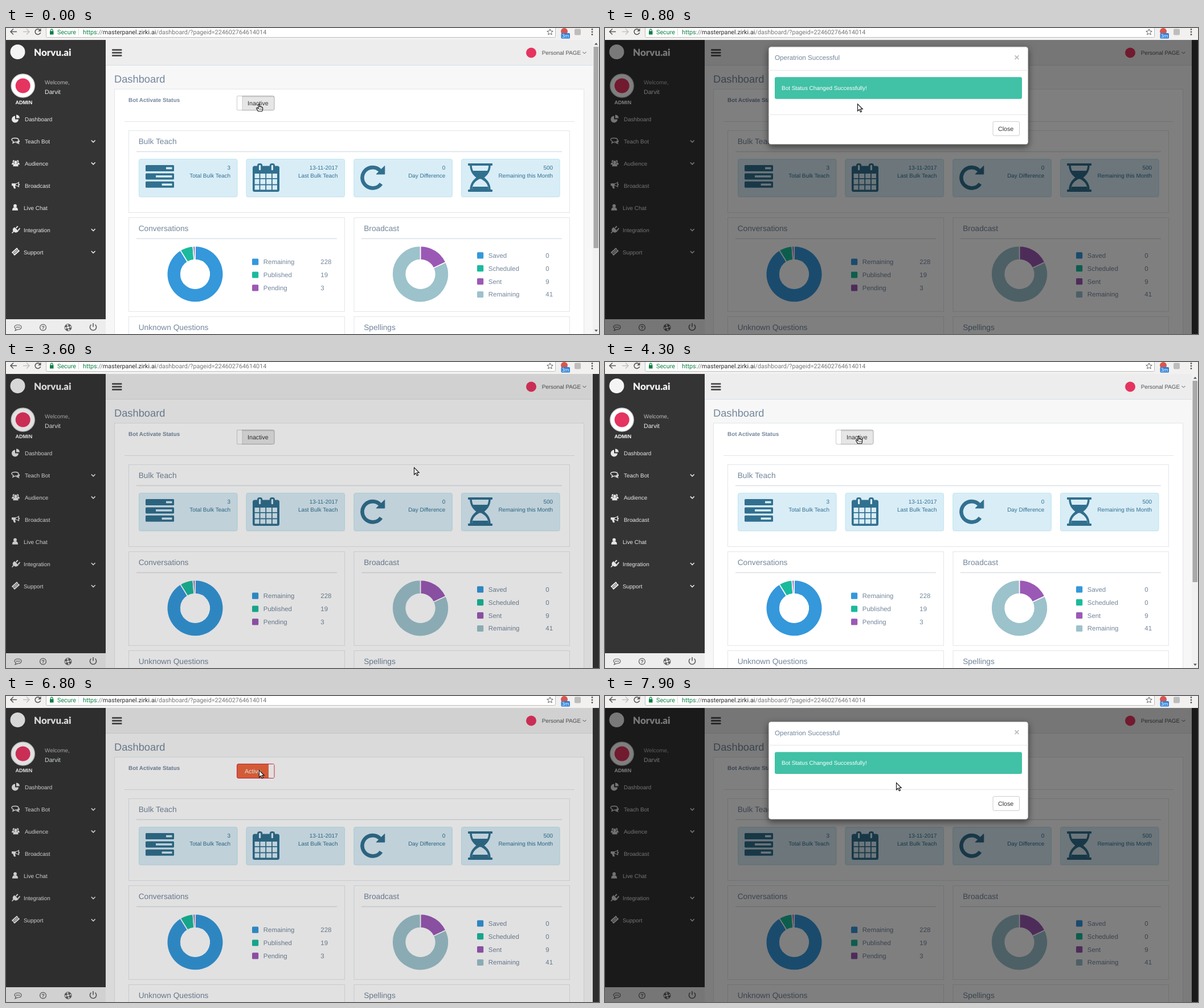
An HTML page for the animation above (8 s loop, 1041x538 px).

```html
<!DOCTYPE html>
<html lang="en">
<head>
<meta charset="utf-8">
<title>Dashboard</title>
<style>
html, body { margin: 0; width: 100%; height: 100%; overflow: hidden; }
svg { display: block; }
text { font-family: "Liberation Sans", Arial, sans-serif; text-rendering: geometricPrecision; white-space: pre; }
.bar text { font-family: Roboto, sans-serif; font-size: 10.75px; }
</style>
</head>
<body>
<svg id="stage" width="1041" height="538" viewBox="0 0 1041 538"></svg>
<script>
const INK = '#73879c', LINE = '#e2e5ea', DARK = '#343434', PALE = '#e7e7e7', INFO = '#31708f';
const BLUE = '#3498db', GREEN = '#1abb9c', PURPLE = '#9b59b6', TEAL = '#9cc2cb', PINK = '#e5345f';

const text = (x, y, s, size = 9.9, fill = INK, more = '') =>
  `<text x="${x}" y="${y}" font-size="${size}" fill="${fill}" ${more}>${s}</text>`;
const rect = (x, y, x2, y2, fill, more = '') =>
  `<rect x="${x}" y="${y}" width="${x2 - x}" height="${y2 - y}" fill="${fill}" ${more}/>`;
const path = (d, fill, more = '') => `<path d="${d}" fill="${fill}" ${more}/>`;
const stroke = (d, color, width = 1, more = '') => path(d, 'none', `stroke="${color}" stroke-width="${width}" ${more}`);
const circle = (x, y, r, fill, more = '') => `<circle cx="${x}" cy="${y}" r="${r}" fill="${fill}" ${more}/>`;
const at = (x, y, body, more = '') => `<g transform="translate(${x} ${y})" ${more}>${body}</g>`;
const border = (x, y, x2, y2, fill, color, more = '') =>
  rect(x + .5, y + .5, x2 - .5, y2 - .5, fill, `stroke="${color}" ${more}`);

function browserBar() {
  return '<g class="bar">' + rect(0, 0, 1041, 21, '#f2f1f0') +
    border(70, -5, 965, 17, '#fff', '#bcbcbc', 'rx="2"') +
    stroke('M19 6.5H8M13 1.5L8 6.5L13 11.5', '#5a5a5a', 1.6) +
    stroke('M30 6.5H41M36 1.5L41 6.5L36 11.5', '#c3c3c3', 1.6) +
    stroke('M60 4A4.8 4.8 0 1 0 60.6 8', '#5a5a5a', 1.6) + path('M61.5 .5V6H56Z', '#5a5a5a') +
    rect(77, 5.5, 83.5, 11.5, '#0b8043') + stroke('M78.5 6V4a1.8 1.8 0 0 1 3.6 0V6', '#0b8043', 1.2) +
    text(90, 10.5, 'Secure', 10.75, '#0b8043') + rect(127, 1, 128, 13, '#ddd') +
    text(135, 10.5, '<tspan fill="#0b8043">https</tspan><tspan fill="#777">://</tspan>masterpanel.zirki.ai' +
      '<tspan fill="#777">/dashboard/?pageid=224602764614014</tspan>', 10.75, '#2d2d2d') +
    path('M955 1.8l1.5 3.5 3.8.3-2.9 2.5.9 3.7-3.3-2-3.3 2 .9-3.7-2.9-2.5 3.8-.3Z', 'none', 'stroke="#666"') +
    circle(980, 6, 6, '#d9564c') + rect(974.5, 9, 990, 18.5, '#2c7fd6', 'rx="1.5"') +
    text(982.2, 17, '3m', 9, '#fff', 'text-anchor="middle" style="font-size:9px"') +
    rect(998, 1.5, 1009, 12.5, '#bdbdbd', 'rx="2"') +
    [2.5, 7, 11.5].map(y => circle(1029, y, 1.4, '#5a5a5a')).join('') + '</g>';
}

const person = (x, y, k) => at(x, y, circle(0, -2.6, 2.9, PALE) + path('M-5 5.5C-5 1 -3 0 0 0S5 1 5 5.5Z', PALE), `style="scale:${k}"`);
const menu = [
  ['Dashboard', path('M-1-5A6 6 0 1 0 5 1H-1Z', PALE) + path('M1-7A6 6 0 0 1 7-1H1Z', PALE)],
  ['Teach Bot', path('M-1-5C3-5 5-3.5 5-1.5S3 2 -1 2L-5 4L-4 1C-6 0-7-1-7-2C-7-4-4-5-1-5Z', 'none', `stroke="${PALE}" stroke-width="1.4"`) +
    path('M6-2C8 0 7 3 5 3L7 6L2 4L-1 3.5C3 3.5 6 1 6-2Z', PALE), 1],
  ['Audience', person(-4.5, -1.5, .72) + person(4.5, -1.5, .72) + at(0, 1.5, circle(0, -3, 3.5, DARK)) + person(0, 1, .9), 1],
  ['Broadcast', path('M-7-3H-1C2-3 4-5 6-6V4C4 3 2 1 -1 1L0 6H-3L-5 1H-7Z', PALE) + path('M0-2C2-2 3-3 4.5-4V2C3 1 2 0 0 0Z', DARK) + circle(6.3, -1, 1, PALE)],
  ['Live Chat', person(-1, 0, 1)],
  ['Integration', path('M-2-4L5 3C2 6 -1 6 -3 4L-6 7L-7 6L-4.5 3C-6 0-5-2-2-4ZM0-3L3-6.5L4.5-5L1-1.5ZM3.5 1L7-3L8-1.5L5 2.5Z', PALE), 1],
  ['Support', path('M-7 1L2-7L4-5C3.5-3.5 4.5-3 6-3L7-1L-2 7L-4 5C-3.5 3.5-4.5 3-6 3Z', PALE) + stroke('M-3.5 1.5L2-3.5L3.5-1.5L-2 3.5Z', DARK, 1), 1]
];

function sidebar() {
  let s = rect(0, 21, 175, 538, DARK) + circle(20.5, 42, 13, '#f4f4f4') +
    text(49, 49, 'Norvu.ai', 17, '#f4f4f4', 'style="font-family:Lato,sans-serif;font-weight:900"') +
    circle(29.7, 101.5, 20.5, '#fff', 'stroke="#d4d4d4" stroke-width="1.5"') + circle(29.7, 101.5, 13, PINK) +
    text(31.3, 133.5, 'ADMIN', 9.1, '#fff', 'font-weight="700" text-anchor="middle"') +
    text(68, 98.5, 'Welcome,', 9.9, '#bab8b8') + text(68, 116, 'Darvit', 10.67, '#ecf0f1');
  menu.forEach(([label, icon, opens], i) => {
    const y = 160.5 + i * 38.95;
    s += at(17, y - 1, icon) + text(i < 4 ? 33 : 31, y + 3.5, label, 9.9, PALE);
    if (opens) s += stroke(`M149.8 ${y - 2}l3.4 3.4l3.4-3.4`, PALE, 1.6);
  });
  const grey = '#5c5c5c';
  return s + rect(0, 512, 175, 538, '#ededed') +
    stroke('M21 522c4 0 6 1.8 6 4s-2 4-6 4l-5 2l1.5-3c-1.5-.8-2.5-1.7-2.5-3c0-2.2 2-4 6-4Z', grey, 1.1) +
    [18.5, 21, 23.5].map(x => circle(x, 526, .9, grey)).join('') +
    circle(65, 526.5, 5.4, 'none', `stroke="${grey}" stroke-width="1.2"`) +
    text(65, 529.8, '?', 9, grey, 'text-anchor="middle" font-weight="700"') +
    circle(109, 526.5, 4.3, 'none', `stroke="${grey}" stroke-width="3" stroke-dasharray="4 2.75"`) +
    circle(109, 526.5, 6, 'none', `stroke="${grey}"`) + circle(109, 526.5, 2.6, 'none', `stroke="${grey}"`) +
    stroke('M149.5 521.5a5.6 5.6 0 1 0 7 0M153 519v6.5', grey, 1.6);
}

function tasksIcon() {
  return [[281, 241], [263, 255.4], [273.6, 269.8]].map(([x, y]) =>
    rect(245, y, 295, y + 11, INFO, 'rx="1.6"') + rect(x, y + 3.7, 291.5, y + 7.3, '#d9edf7')).join('');
}

function calendarIcon() {
  let s = rect(433, 242.5, 480, 288, INFO, 'rx="3.5"');
  for (const [x, x2] of [[436.6, 444.6], [446.4, 455.3], [457.1, 466], [467.8, 476]])
    for (const [y, y2] of [[256, 264], [265.7, 274.6], [276.4, 284.4]]) s += rect(x, y, x2, y2, '#d9edf7');
  for (const x of [445.6, 467.4])
    s += rect(x - 4.6, 238, x + 4.6, 253, INFO, 'rx="4"') + rect(x - 1.6, 241, x + 1.6, 250, '#d9edf7', 'rx="1"');
  return s;
}

const repeatIcon = () => stroke('M658.5 273.8A18.2 18.2 0 1 1 656.5 250.4', INFO, 6.6) +
  path('M664.8 242.5V257H650Z', INFO, `stroke="${INFO}" stroke-linejoin="round"`);

const hourglassIcon = () => rect(811, 238, 854, 242, INFO, 'rx="1"') + rect(811, 284, 854, 288, INFO, 'rx="1"') +
  stroke('M816 241C816 252 821 258 828.5 263C821 268 816 274 816 285M849 241C849 252 844 258 836.5 263C844 268 849 274 849 285', INFO, 3.5) +
  path('M818 251H847C845 257 840 261 836 263C840 265 844 269 846 273L847 285H818L819 273C821 269 825 265 829 263C825 261 820 257 818 251Z', INFO) +
  path('M831 265.5H834C841 269 845 274 846 279H819C820 274 824 269 831 265.5Z', '#d9edf7');

function panel(x, y, x2, y2, title) {
  const inner = x === 215 ? 14 : 13.5;
  return border(x, y, x2, y2, '#fff', LINE) + text(x + 17.7, y + 24.3, title, 13.72) +
    rect(x + inner, y + 36.5, x2 - 14, y + 38.2, '#dfe3e8');
}

function donut(cx, cy, slices) {
  const total = slices.reduce((sum, [n]) => sum + n, 0);
  let turn = 0, s = '';
  const point = (r, a) => `${cx + r * Math.sin(a)} ${cy - r * Math.cos(a)}`;
  for (const [n, color] of slices) {
    const a = turn, b = turn += n / total * 2 * Math.PI, big = +(b - a > Math.PI);
    s += path(`M${point(49.3, a)}A49.3 49.3 0 ${big} 1 ${point(49.3, b)}L${point(25.3, b)}A25.3 25.3 0 ${big} 0 ${point(25.3, a)}Z`,
      color, 'stroke="#fff" stroke-width="1.6"');
  }
  return s;
}

const legend = (x, y, rows) => rows.map(([label, n, color], i) => {
  const cy = y + i * 22.9;
  return rect(x, cy - 5.5, x + 11.2, cy + 5.7, color, 'rx="1.5"') +
    text(x + 19.8, cy + 4, label, 11.43) + text(x + 120.3, cy + 4, n, 11.43);
}).join('');

function page() {
  const cards = [[233, 3, 'Total Bulk Teach'], [421.5, '13-11-2017', 'Last Bulk Teach'], [610.3, 0, 'Day Difference'], [799, 500, 'Remaining this Month']];
  return rect(175, 21, 1030, 538, '#f7f7f7') + rect(175, 21, 1030, 65, '#ededed') + rect(175, 65, 1030, 66, '#d9dee4') +
    [37, 42, 47].map(y => rect(186, y, 203.5, y + 3, '#555', 'rx="1"')).join('') +
    circle(922, 43.5, 9, PINK) + text(940.7, 46.7, 'Personal PAGE', 9.9, '#515356') + stroke('M1012.5 42l3 3l3-3', '#515356') +
    text(190, 96.2, 'Dashboard', 18.29) + border(190, 107, 1015, 545, '#fff', LINE) +
    text(215, 129.8, 'Bot Activate Status', 9.9, INK, 'font-weight="700"') + rect(208, 164, 998, 165, '#e4e4e4') +
    panel(215, 180, 990, 325, 'Bulk Teach') +
    cards.map(([x, n, label]) => rect(x, 231, x + 173.5, 298, '#000', 'rx="3" opacity=".06"') +
      border(x, 230, x + 173.5, 297, '#d9edf7', '#bce8f1', 'rx="3"') +
      text(x + 161, 248.8, n, 9.9, INFO, 'text-anchor="end"') + text(x + 161, 263.4, label, 9.9, INFO, 'text-anchor="end"')).join('') +
    tasksIcon() + calendarIcon() + repeatIcon() + hourglassIcon() +
    panel(215, 333, 595, 499, 'Conversations') + panel(610.5, 333, 990, 499, 'Broadcast') +
    donut(332, 432.8, [[228, BLUE], [19, GREEN], [3, PURPLE]]) + donut(727.5, 432.8, [[9, PURPLE], [41, TEAL]]) +
    legend(432, 411, [['Remaining', 228, BLUE], ['Published', 19, GREEN], ['Pending', 3, PURPLE]]) +
    legend(827, 399.7, [['Saved', 0, BLUE], ['Scheduled', 0, GREEN], ['Sent', 9, PURPLE], ['Remaining', 41, TEAL]]) +
    panel(215, 507, 595, 560, 'Unknown Questions') + panel(610.5, 507, 990, 560, 'Spellings');
}

const toggles = `<g id="off">${border(405, 119, 471.5, 145, '#e6e6e6', '#adadad', 'rx="2.5"')}` +
  rect(406, 120, 471, 122, '#000', 'opacity=".07"') + border(405, 119, 415.5, 145, '#fff', '#ccc', 'rx="2"') +
  text(424, 135.8, 'Inactive', 10.67, '#333') +
  `</g><g id="on">${border(405, 119, 471.5, 145, '#ee673c', '#d9274f', 'rx="2.5"')}` +
  rect(461, 120, 470.5, 144, '#fff', 'rx="1"') + text(419, 135.8, 'Active', 10.67, '#fff') + '</g>';

const scrollbar = `<g id="scrollbar">${rect(1030, 21, 1041, 538, '#f1f1f1')}${rect(1031.5, 33, 1040, 387, '#a9a9a9')}` +
  path('M1033 29.5h6l-3-3.5Z', '#505050') + path('M1033 530.5h6l-3 3.5Z', '#505050') + '</g>';

const dialog = '<g id="dialog">' +
  border(286.5, 44.5, 743.5, 217.5, '#fff', '#777', 'rx="4.5" style="filter:drop-shadow(0 4px 6px rgba(0,0,0,.5))"') +
  text(298, 68.5, 'Operatrion Successful', 11.6) + text(723, 69, '×', 16, '#bbb', 'text-anchor="middle" font-weight="700"') +
  rect(287, 86, 743, 87, '#e5e5e5') + rect(298, 98.5, 732, 137, '#41c1a6', 'rx="3"') +
  text(310, 121.4, 'Bot Status Changed Successfully!', 9.95, '#fff') + rect(287, 164, 743, 165, '#e5e5e5') +
  border(680.5, 176, 728, 202, '#fff', '#ccc', 'rx="2.5" id="close"') + text(690, 192.8, 'Close', 10.67, '#333') + '</g>';

const cursors = '<g id="arrow">' +
  path('M.5 .5V13L3.4 10.3L5.4 14.8L7.5 13.9L5.5 9.5H9.2Z', '#fff', 'stroke="#111" stroke-width="1.1"') + '</g><g id="hand">' +
  path('M0 1C0-.5 2-.5 2 1V5C3 4 4 4.3 4.2 5.2C5 4.6 6 5 6 5.9C7 5.5 7.6 6 7.6 7V9.5C7.6 11 7 11.5 6.6 12.8H-.6C-1-11 0 11-3.2 8.3C-4 7-2.5 6.2-1.6 7L0 8.4Z'.replace('-1-11 0 11', '-1 11 -2 10'),
    '#fff', 'stroke="#111" stroke-width="1.1"') + stroke('M2.2 8v2.5M4 8v2.5M5.8 8v2.5', '#111', .7) + '</g>';

const stage = document.getElementById('stage');
stage.innerHTML = rect(0, 21, 1041, 538, DARK) + page() + toggles + scrollbar + sidebar() +
  rect(0, 21, 1041, 538, '#000', 'id="shade"') + dialog + browserBar() + cursors;
const el = {};
for (const id of ['off', 'on', 'scrollbar', 'shade', 'dialog', 'close', 'arrow', 'hand']) el[id] = document.getElementById(id);

const clamp = v => Math.max(0, Math.min(1, v));
const show = (node, visible) => node.setAttribute('visibility', visible ? 'visible' : 'hidden');

// Pointer stops: time, x, y
const route = [[0, 443, 133], [1200, 443, 133], [1500, 414, 138], [1800, 414, 138], [2400, 731, 186], [2500, 731, 186],
  [2800, 716, 185], [3700, 716, 185], [4200, 447, 130], [4300, 444, 130], [7700, 444, 130], [7900, 511, 152], [8000, 511, 152]];

function pointer(t) {
  const i = route.findIndex(([time]) => time > t);
  const [t0, x0, y0] = route[i - 1], [t1, x1, y1] = route[i];
  const k = (t - t0) / (t1 - t0);
  return [x0 + (x1 - x0) * k, y0 + (y1 - y0) * k];
}

function modalState(t) {
  if (t >= 3335 && t < 6800) {
    const gone = t - 3335;
    return { shade: 1 - clamp((gone - 150) / 150), alpha: 1 - clamp(gone / 150), lift: 1 - (1 - clamp(gone / 300)) ** 1.66 };
  }
  const since = t - (t < 3335 ? 500 : 6800);
  return { shade: since < 0 ? 0 : clamp((since + 35) / 150), alpha: clamp((since - 140) / 150), lift: (1 - clamp((since - 140) / 300)) ** 1.66 };
}

function draw(now) {
  const t = Math.floor(now % 8000 / 100) * 100;
  const { shade, alpha, lift } = modalState(t);
  el.shade.setAttribute('opacity', shade / 2);
  el.dialog.setAttribute('opacity', alpha);
  el.dialog.setAttribute('transform', `translate(0 ${-43 * lift})`);
  show(el.scrollbar, shade === 0);
  show(el.on, t >= 5900);
  show(el.off, t < 5900);

  const hover = t >= 2600 && t < 3500, pressed = hover && t >= 3200;
  el.close.setAttribute('fill', pressed ? '#d4d4d4' : hover ? '#e6e6e6' : '#fff');
  el.close.setAttribute('stroke', pressed ? '#8c8c8c' : hover ? '#adadad' : '#ccc');

  const hand = t < 500 || hover || t >= 4200 && t < 6800;
  const [x, y] = pointer(t);
  el.arrow.setAttribute('transform', `translate(${x} ${y})`);
  el.hand.setAttribute('transform', `translate(${x} ${y + .5})`);
  show(el.hand, hand);
  show(el.arrow, !hand);
  requestAnimationFrame(draw);
}

const start = performance.now();
draw(0);
function tick() { draw(performance.now() - start); }
</script>
</body>
</html>
```
